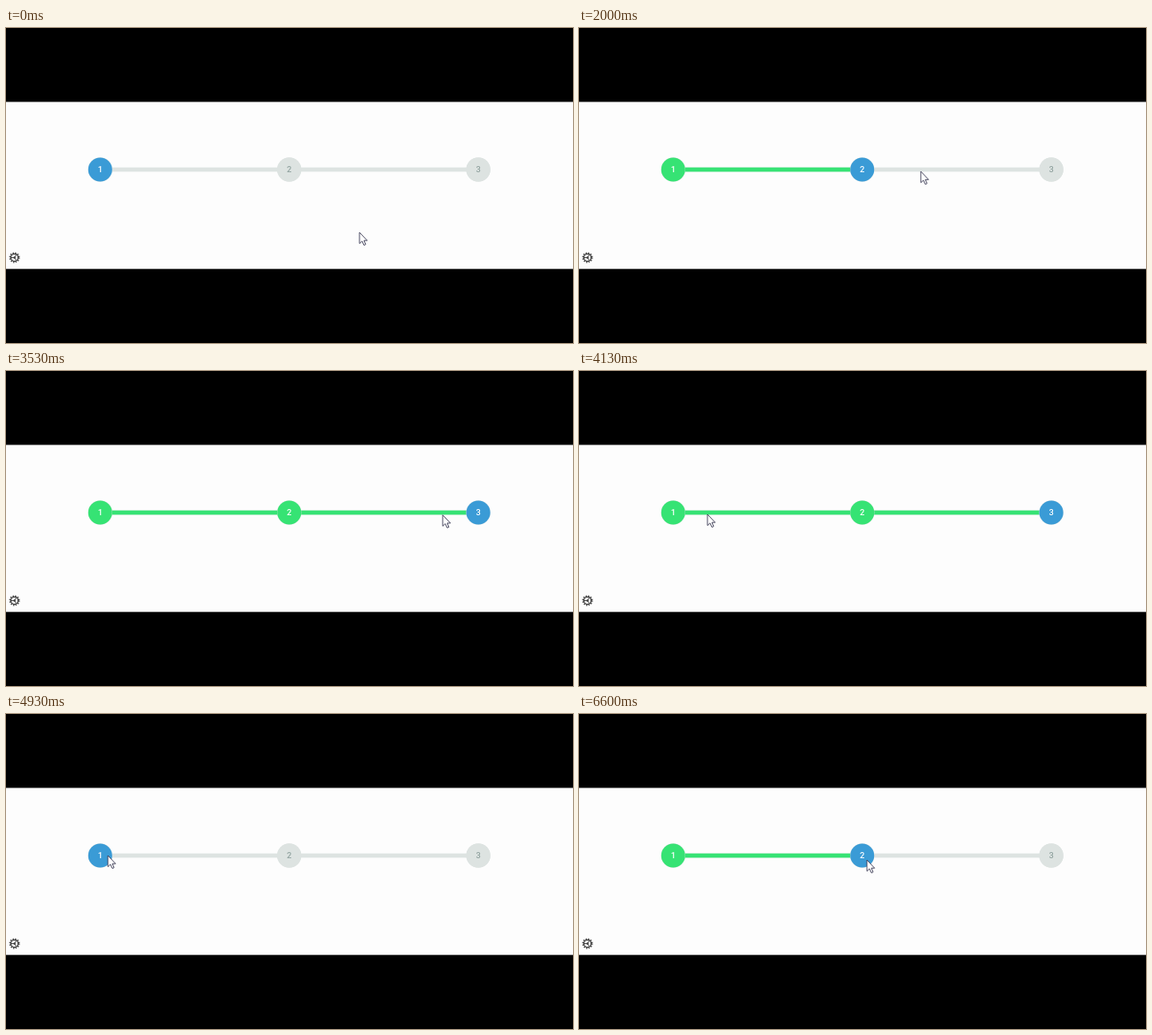
Recreate the animation shown at these times as an HTML page with a canvas. Size 640x356 px, loop 6.86 s.

```html
<!DOCTYPE html>
<html lang="en">
<head>
<meta charset="utf-8">
<title>Step progress</title>
<style>
  html, body { margin: 0; width: 100%; height: 100%; overflow: hidden; background: #000; }
  canvas { display: block; width: 640px; height: 356px; }
</style>
</head>
<body>
<canvas id="stage"></canvas>
<script>
const W = 640, H = 356, LOOP = 6860, TICK = 200 / 3;
const canvas = document.getElementById('stage');
const ctx = canvas.getContext('2d');
const dpr = window.devicePixelRatio || 1;
canvas.width = W * dpr;
canvas.height = H * dpr;

const GREY = [221, 227, 225], BLUE = [58, 155, 214], GREEN = [54, 227, 116];
const MUTED = [145, 163, 160], WHITE = [255, 255, 255];
const STEPS = [106.3, 319.7, 533.1], MID = 160, RADIUS = 13.7;

// Pointer path: [tick, x, y]
const PATH = [
  [6, 399, 231], [10, 356, 190], [13, 326.5, 162.5], [14, 326.5, 162.5],
  [15, 327, 161.7], [27, 327, 161.7], [32, 440, 162.5], [37, 529, 163],
  [51, 529, 163], [57, 330, 162], [62, 145, 162], [67, 113, 162],
  [70, 113, 162], [74, 115, 160], [80, 247, 162.5], [85, 311, 164],
  [90, 325, 165], [103, 325, 165]
];

// Each click shows a ring for two ticks, then moves to another step
const CLICKS = [
  { tick: 19, to: 1, x: 328.2, y: 162.7 },
  { tick: 43, to: 2, x: 529.8, y: 163.4 },
  { tick: 70, to: 0, x: 113.8, y: 163 },
  { tick: 95, to: 1, x: 326.4, y: 166 }
];
const HOLD = 2, FADE = 3;

const clamp = v => Math.max(0, Math.min(1, v));
const lerp = (a, b, p) => a + (b - a) * p;
const mix = (a, b, p) => `rgb(${a.map((v, i) => Math.round(lerp(v, b[i], p)))})`;

function slope(i, axis) {
  return (PATH[i + 1][axis] - PATH[i][axis]) / (PATH[i + 1][0] - PATH[i][0]);
}

// Monotone tangent, so the pointer never overshoots
function tangent(i, axis) {
  if (i === 0 || i === PATH.length - 1) return 0;
  const a = slope(i - 1, axis), b = slope(i, axis);
  return a * b > 0 ? 2 * a * b / (a + b) : 0;
}

function pointerAt(tick) {
  if (tick <= PATH[0][0]) return PATH[0].slice(1);
  let i = 0;
  while (i < PATH.length - 2 && tick >= PATH[i + 1][0]) i++;
  const span = PATH[i + 1][0] - PATH[i][0];
  const u = clamp((tick - PATH[i][0]) / span), v = 1 - u;
  return [1, 2].map(axis =>
    (1 + 2 * u) * v * v * PATH[i][axis] + u * v * v * span * tangent(i, axis) +
    u * u * (3 - 2 * u) * PATH[i + 1][axis] - u * u * v * span * tangent(i + 1, axis));
}

function progressAt(tick) {
  let from = 0, to = 0, p = 1;
  for (const c of CLICKS) {
    const start = c.tick + HOLD;
    if (tick < start) break;
    from = to;
    to = c.to;
    p = clamp((tick - start + 1) / FADE);
  }
  return { from, to, p };
}

const fillOf = (i, step) => i < step ? GREEN : i === step ? BLUE : GREY;
const inkOf = (i, step) => i > step ? MUTED : WHITE;

function disc(x, y, r, color) {
  ctx.fillStyle = color;
  ctx.beginPath();
  ctx.arc(x, y, r, 0, Math.PI * 2);
  ctx.fill();
}

function circle(x, y, r, width, color) {
  ctx.strokeStyle = color;
  ctx.lineWidth = width;
  ctx.beginPath();
  ctx.arc(x, y, r, 0, Math.PI * 2);
  ctx.stroke();
}

function bar(x1, x2, color) {
  ctx.fillStyle = color;
  ctx.fillRect(x1, MID - 2.4, x2 - x1, 4.8);
}

function drawStepper({ from, to, p }) {
  const grey = mix(GREY, GREY, 0);
  bar(STEPS[0], STEPS[2], grey);
  bar(STEPS[0], lerp(STEPS[from], STEPS[to], p), mix(GREEN, GREEN, 0));
  ctx.font = '500 9.4px Roboto, sans-serif';
  ctx.textAlign = 'center';
  ctx.textBaseline = 'alphabetic';
  STEPS.forEach((x, i) => {
    disc(x, MID, RADIUS, grey);
    disc(x, MID, RADIUS - 0.2, mix(fillOf(i, from), fillOf(i, to), p));
    ctx.fillStyle = mix(inkOf(i, from), inkOf(i, to), p);
    ctx.fillText(i + 1, x, MID + 3.1);
  });
}

function drawGear() {
  const x = 9.6, y = 259.5, ink = '#3c3c3c';
  const tooth = Math.PI * 2 * 5.2 / 24;
  ctx.setLineDash([tooth, tooth]);
  circle(x, y, 5.2, 1.6, ink);
  ctx.setLineDash([]);
  circle(x, y, 4.1, 1.3, ink);
  ctx.lineWidth = 0.9;
  ctx.beginPath();
  for (let i = 0; i < 3; i++) {
    const a = i * Math.PI * 2 / 3 + Math.PI;
    ctx.moveTo(x, y);
    ctx.lineTo(x + 4 * Math.cos(a), y + 4 * Math.sin(a));
  }
  ctx.stroke();
  disc(x, y, 1.2, ink);
}

function drawPointer([x, y]) {
  ctx.save();
  ctx.translate(x, y);
  const shape = new Path2D('M0 0V12.6L2.9 9.9L5 14.5L7 13.6L5 9.2H8.7Z');
  ctx.fillStyle = '#fff';
  ctx.fill(shape);
  ctx.strokeStyle = '#3b3b55';
  ctx.lineWidth = 0.9;
  ctx.stroke(shape);
  ctx.restore();
}

function draw(time) {
  const tick = Math.floor((Math.floor(time / 10) * 10 + 7) / TICK);
  ctx.setTransform(dpr, 0, 0, dpr, 0, 0);
  ctx.fillStyle = '#000';
  ctx.fillRect(0, 0, W, H);
  ctx.fillStyle = '#fdfdfd';
  ctx.fillRect(0, 83.5, W, 188.8);
  drawStepper(progressAt(tick));
  drawGear();
  const click = CLICKS.find(c => tick >= c.tick && tick < c.tick + HOLD);
  if (click) circle(click.x, click.y, 25.7, 3.3, '#ed6f81');
  drawPointer(pointerAt(tick));
}

const begin = performance.now();
function loop() {
  draw((performance.now() - begin) % LOOP);
  requestAnimationFrame(loop);
}
loop();
</script>
</body>
</html>
```
